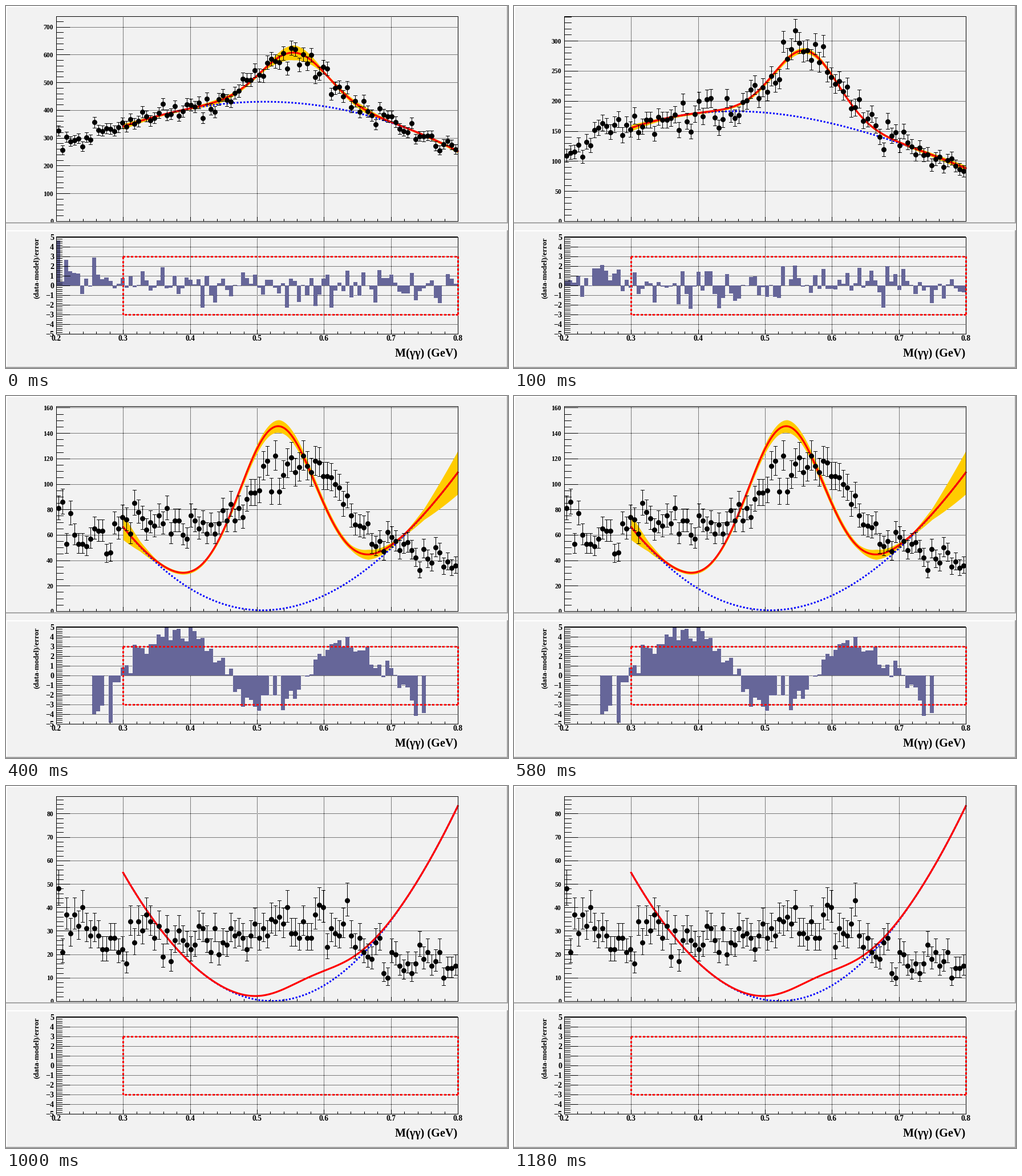
Animation of 880x636 px, one loop 1300 ms. Source, as a matplotlib script:

```python
import math
import numpy as np
import matplotlib.pyplot as plt
from matplotlib.animation import FuncAnimation
from matplotlib.collections import LineCollection, PatchCollection
from matplotlib.patches import Rectangle

W, H, DPI = 880, 636, 100
PX = 72 / DPI
LEFT, RIGHT, TOP, BASE = 88, 792, 18, 378
RES_TOP, RES_BASE = 406, 576
BG, BAR, GOLD = "#f2f2f2", "#666699", "#ffcc00"

plt.rcParams["font.family"] = "Liberation Serif"
plt.rcParams["font.weight"] = "bold"

fig = plt.figure(figsize=(W / DPI, H / DPI), dpi=DPI, facecolor=BG)
ax = fig.add_axes([0, 0, 1, 1])
ax.set(xlim=(0, W), ylim=(H, 0))
ax.axis("off")

MASS = 0.2 + 0.006 * (np.arange(100) + 0.5)
FIT_X = np.linspace(0.3, 0.8, 300)


def px(m):
    return LEFT + (np.asarray(m) - 0.2) / 0.6 * (RIGHT - LEFT)


def res_y(r):
    return 491 - np.asarray(r) * 17


def knot_curve(m, knots):
    return np.interp(m, *zip(*knots))


def lines(segs, width=1, color="k", dash=None, z=2):
    style = "solid" if dash is None else (0, dash)
    lc = LineCollection(segs, colors=color, linewidths=width * PX,
                        linestyles=[style], antialiaseds=False, zorder=z)
    return ax.add_collection(lc)


def hline(y, x0=LEFT, x1=RIGHT):
    y = round(float(y))
    return [(x0, y), (x1, y)]


def vline(x, y0, y1):
    x = round(float(x))
    return [(x, y0), (x, y1)]


def dots(segs):
    return lines(segs, dash=(1, 2), z=1)


def label(x, y, s, size, ha="right", va="center_baseline", **kw):
    return ax.text(x, y, s, size=size * PX, ha=ha, va=va, zorder=6, **kw)


def box(y0, y1):
    ax.add_patch(Rectangle((LEFT, y0), RIGHT - LEFT, y1 - y0, fill=False,
                           lw=PX, ec="k", antialiased=False, zorder=7))


def bevel(y0, y1):
    def strip(x, y, w, h, c):
        ax.add_patch(Rectangle((x, y), w, h, fc=c, lw=0, zorder=9))
    strip(0, y0, W, 2, "white")
    strip(0, y0, 2, y1 - y0, "white")
    strip(0, y1 - 2, W, 2, "#a3a3a3")
    strip(W - 2, y0, 2, y1 - y0, "#a3a3a3")


def draw_static():
    ax.add_patch(Rectangle((0, 380), W, 16, fc=BG, lw=0, zorder=8))
    bevel(0, 382)
    bevel(394, 636)
    box(TOP, BASE)
    box(RES_TOP, RES_BASE)
    lines([hline(RES_TOP)], 2, z=7)

    ticks = []
    for k in range(31):
        x = px(0.2 + 0.02 * k)
        size = 8 if k % 5 == 0 else 4
        ticks += [vline(x, b, b - size) for b in (BASE, RES_BASE)]
    for k in range(-25, 26):
        ticks.append(hline(res_y(k / 5), x1=LEFT + (24 if k % 5 == 0 else 10)))
    lines(ticks, z=7)

    grid_x = px([0.3, 0.4, 0.5, 0.6, 0.7])
    dots([vline(x, TOP, BASE) for x in grid_x]
         + [vline(x, RES_TOP, RES_BASE) for x in grid_x]
         + [hline(res_y(r)) for r in range(-4, 5)])

    for r in range(-5, 6):
        label(84, res_y(r), str(r).replace("-", "\u2212"), 14)
    for k in range(2, 9):
        label(px(k / 10), 583.5, f"0.{k}", 13.5, ha="center")
    label(54, 406.5, "(data-model)/error", 13.4, ha="center", va="top", rotation=90)
    label(791, 616, "M(\u03b3\u03b3) (GeV)", 20.3, va="baseline")

    x0, x1, y0, y1 = px(0.3), RIGHT, res_y(3), res_y(-3)
    lines([[(x0, y0), (x1, y0)], [(x1, y0), (x1, y1)],
           [(x1, y1), (x0, y1)], [(x0, y1), (x0, y0)]],
          3, "red", (1, 1), z=8)


class Spectrum:
    """Noisy counts fitted by a polynomial background plus a Gaussian peak."""

    def __init__(self, seed, vmax, major, minor, knots, peak, band, rate):
        self.vmax, self.major, self.minor = vmax, major, minor
        self.scale = (BASE - TOP) / vmax
        xs, ys = zip(*knots)
        self.poly = np.polyfit(xs, ys, len(xs) - 1)
        self.peak, self.band = peak, band
        self.counts = self.sample(seed, rate)
        self.artists = self.axis() + self.fit() + self.points() + self.residuals()

    def sample(self, seed, rate):
        # Beyond the last rate knot the counts scatter around the model.
        mean = np.where(MASS < rate[-1][0], knot_curve(MASS, rate), self.model(MASS))
        noise = np.random.default_rng(seed).standard_normal(len(MASS))
        return np.round(mean + np.sqrt(mean) * noise.clip(-2.2, 2.2))

    def show(self, on):
        for a in self.artists:
            a.set_visible(on)

    def y(self, v):
        return BASE - np.asarray(v) * self.scale

    def background(self, m):
        return np.polyval(self.poly, m)

    def model(self, m):
        amp, mean, sigma = self.peak
        return self.background(m) + amp * np.exp(-0.5 * ((m - mean) / sigma) ** 2)

    def axis(self):
        top = math.ceil(self.vmax)
        majors = range(0, top, self.major)
        ticks = [hline(self.y(v), x1=LEFT + (24 if v % self.major == 0 else 12))
                 for v in range(0, top, self.minor)]
        out = [lines(ticks, z=7), dots([hline(self.y(v)) for v in majors[1:]])]
        return out + [label(83, self.y(v), str(v), 11.6) for v in majors]

    def fit(self):
        x, fit = px(FIT_X), self.model(FIT_X)
        out = []
        if self.band:
            half = knot_curve(FIT_X, self.band)
            out.append(ax.fill_between(x, self.y(fit - half), self.y(fit + half),
                                       color=GOLD, lw=0, zorder=2))
        out += ax.plot(x, self.y(self.background(FIT_X)), color="blue", lw=3 * PX,
                       ls=(0, (1, 1)), dash_capstyle="butt", zorder=3)
        out += ax.plot(x, self.y(fit), color="red", lw=3.2 * PX, zorder=4)
        return out

    def points(self):
        x, n = px(MASS), self.counts
        lo = self.y(n - np.sqrt(n - 0.25))
        hi = self.y(n + 1 + np.sqrt(n + 0.75))
        segs = []
        for a, b, c in zip(x, lo, hi):
            segs += [vline(a, b, c), hline(b, a - 3, a + 3), hline(c, a - 3, a + 3)]
        return [lines(segs, z=5)] + ax.plot(x, self.y(n), "o", color="k",
                                            ms=9 * PX, mew=0, zorder=5)

    def residuals(self):
        if not self.band:
            return []
        pull = (self.counts - self.model(MASS)) / np.sqrt(self.counts)
        step = (RIGHT - LEFT) / len(pull)
        bars = [Rectangle((LEFT + i * step, res_y(0)), step, res_y(min(r, 5)) - res_y(0))
                for i, r in enumerate(pull) if r > -5]
        pc = PatchCollection(bars, facecolor=BAR, lw=0, antialiaseds=False, zorder=3)
        return [ax.add_collection(pc)]


draw_static()

spectra = [
    Spectrum(
        3, 738.2, 100, 20,
        knots=[(.3, 341), (.5, 430), (.7, 355), (.8, 252)],
        peak=(181, .5563, .0492),
        band=[(.3, 10), (.35, 4), (.4, 4), (.44, 9), (.5, 5), (.515, 8),
              (.54, 23), (.555, 27), (.57, 22), (.6, 5), (.66, 11), (.7, 3), (.8, 6)],
        rate=[(.2, 290), (.25, 308), (.28, 345), (.3, 345)]),
    Spectrum(
        8, 340.7, 50, 10,
        knots=[(.3, 155), (.5, 180.5), (.7, 130), (.8, 88)],
        peak=(112, .5614, .0471),
        band=[(.3, 5), (.35, 2), (.45, 2), (.555, 4.5), (.65, 2), (.7, 2), (.8, 4.5)],
        rate=[(.2, 128), (.23, 133), (.26, 148), (.3, 153)]),
    Spectrum(
        21, 161.1, 20, 5,
        knots=[(.3, 66), (.4, 17.75), (.6, 12.26), (.8, 109)],
        peak=(144, .53, .0595),
        band=[(.3, 10), (.325, 4), (.35, 1.2), (.43, 1.2), (.5, 3.5), (.533, 5),
              (.6, 3), (.64, 2), (.666, 4), (.72, 1), (.75, 4.5), (.8, 17)],
        rate=[(.2, 80), (.225, 60), (.3, 57), (.315, 74), (.35, 68), (.44, 66),
              (.49, 92), (.55, 120), (.575, 122), (.59, 108), (.622, 104),
              (.645, 70), (.67, 55), (.7, 52), (.74, 43), (.78, 44), (.8, 28)]),
    Spectrum(
        5, 69.99, 10, 2,
        knots=[(.3, 58.3), (.5, .4), (.6, 6), (.8, 16.8)],
        peak=(55.8, .5446, .0592),
        band=[(.3, 4), (.35, 2.2), (.42, 1.1), (.5, 2), (.6, 2), (.65, 1.2),
              (.75, 1.5), (.8, 2.6)],
        rate=[(.2, 33), (.22, 26), (.3, 25), (.32, 29), (.37, 29), (.4, 34),
              (.43, 24), (.48, 33), (.54, 43), (.57, 49), (.61, 48), (.64, 36),
              (.66, 24), (.7, 24), (.72, 19), (.76, 15), (.8, 17)]),
    Spectrum(
        13, 87.4, 10, 2,
        knots=[(.3, 54.8), (.4, 16.5), (.5, .6), (.8, 83.2)],
        peak=(6.8, .58, .047),
        band=None,
        rate=[(.2, 38), (.22, 29), (.25, 31), (.27, 23), (.3, 24), (.33, 28),
              (.36, 24), (.45, 28), (.49, 25), (.53, 31), (.58, 30), (.6, 37),
              (.63, 35), (.665, 18), (.68, 27), (.695, 17), (.75, 17), (.8, 14)]),
]


def update(k):
    current = 0 if k == 0 else 1 + (k - 1) // 3
    for i, s in enumerate(spectra):
        s.show(i == current)
    return []


anim = FuncAnimation(fig, update, frames=13, interval=100, repeat=True,
                     repeat_delay=0, blit=False)
plt.show()
```
